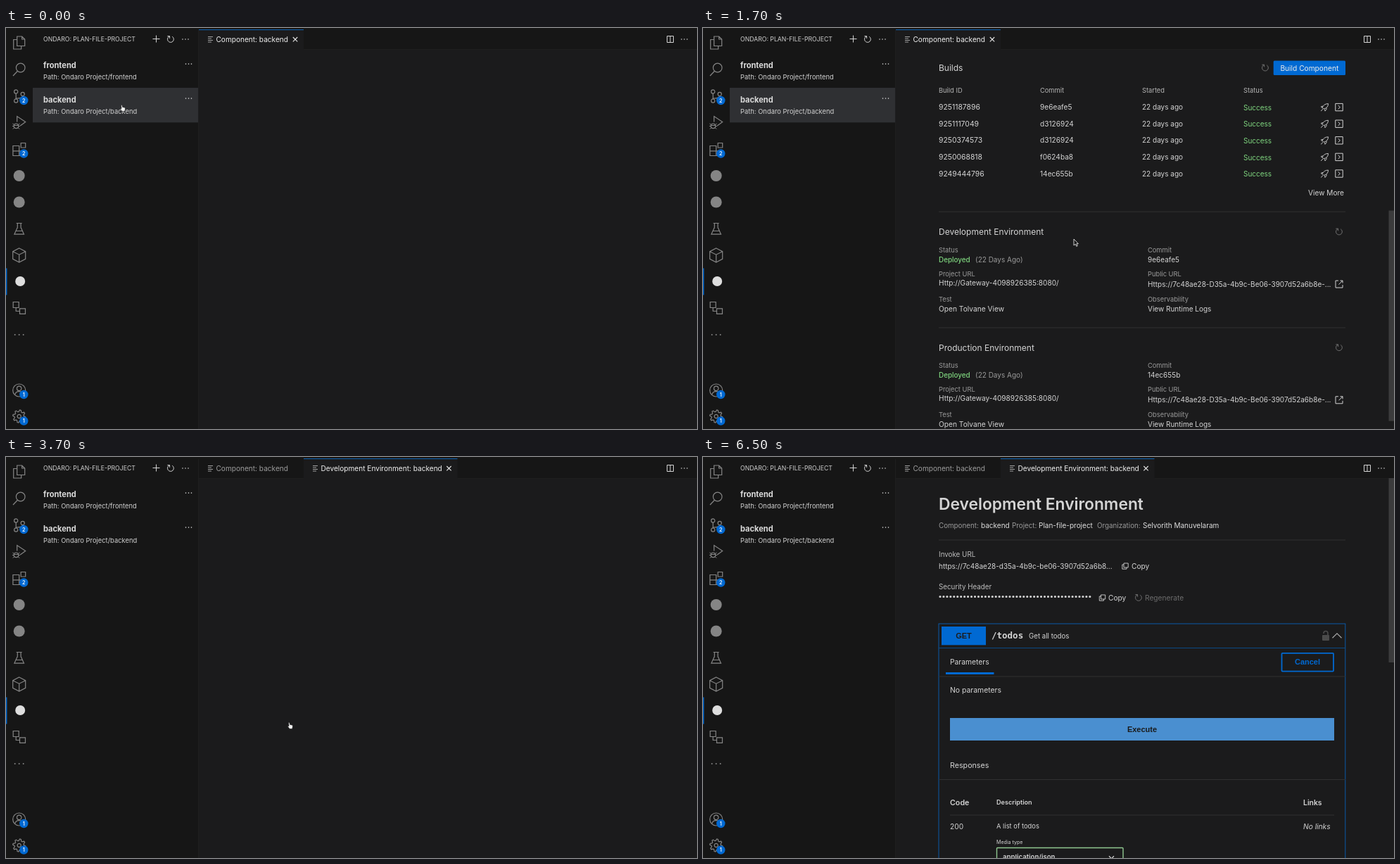
Recreate the animation shown at these times as an HTML page. Size 982 by 570 pixels, loop 6.6 s.

```html
<!DOCTYPE html>
<html lang="en">
<head>
<meta charset="utf-8">
<title>Component view</title>
<style>
  html, body { margin: 0; width: 100%; height: 100%; overflow: hidden; background: #161616; }
  svg { display: block; font-family: Inter, "Open Sans", sans-serif; }
  text { white-space: pre; }
  .helv { font-family: "Liberation Sans", Arial, sans-serif; font-weight: 700; }
  .mono { font-family: "DejaVu Sans Mono", monospace; font-weight: 700; }
</style>
</head>
<body>
<svg id="stage" width="982" height="570" viewBox="0 0 982 570"></svg>
<script>
const LOOP = 6600, STEP = 100, MAX_SCROLL = 436.8;
const BLUE = '#0069d2', GREEN = '#7fd67f', SIDE = '#161616', EDITOR = '#1b1b1c';
const TEXT = '#d4d4d4', DIM = '#9a9a9a', ICON = '#858585', RULE = '#303031';

const PROJECT = 'Plan-file-project', OWNER = 'Selvorith Manuvelaram';
const HOST = '7c48ae28-d35a-4b9c-be06-3907d52a6b8';

// Drawing helpers
const text = (x, y, s, size = 10, fill = TEXT, extra = '') =>
  `<text x="${x}" y="${y}" font-size="${size}" fill="${fill}" ${extra}>${s}</text>`;
const rect = (x, y, w, h, fill, extra = '') =>
  `<rect x="${x}" y="${y}" width="${w}" height="${h}" fill="${fill}" ${extra}/>`;
const line = (d, stroke = ICON, width = 1.2, extra = '') =>
  `<path d="${d}" fill="none" stroke="${stroke}" stroke-width="${width}" ${extra}/>`;
const circle = (x, y, r, fill, extra = '') => `<circle cx="${x}" cy="${y}" r="${r}" fill="${fill}" ${extra}/>`;
const at = (x, y, body, id = '') => `<g ${id && `id="${id}"`} transform="translate(${x} ${y})">${body}</g>`;
const group = (id, body) => `<g id="${id}">${body}</g>`;
const rule = (y, x1 = 335, x2 = 913) => line(`M${x1} ${y}H${x2}`, RULE, 1);
const END = 'text-anchor="end"', MID = 'text-anchor="middle"';
const bold = w => `font-weight="${w}"`;

const dots = (x, y, fill = TEXT, gap = 4, r = 0.8) =>
  [-1, 0, 1].map(i => circle(x + i * gap, y, r, fill)).join('');
const cross = (x, y) => line(`M${x - 3.2} ${y - 3.2}l6.4 6.4m0 -6.4l-6.4 6.4`, '#e4e4e4', 1.1);
const refresh = (x, y, c = '#707070') =>
  at(x, y, line('M-1.5 -4.2A4.4 4.4 0 1 0 2.2 -3.8M-4.6 -4.4H-1.4V-1.2', c, 1));
const copyIcon = (x, y) =>
  at(x, y, line('M-2 -4H4.2V2H-2ZM-2 -2H-4.2V4.2H2V2', TEXT, 0.9));
const tabIcon = x => line(`M${x} 12.5h7M${x} 15h5M${x} 17.5h7M${x} 20h5`, '#b0b0b0', 0.9);
const chevron = (x, y, up, c = '#a8a8a8', w = 6.5) =>
  line(`M${x - w} ${y + (up ? w / 2 : -w / 2)}l${w} ${up ? -w : w}l${w} ${up ? w : -w}`, c, 1.2);
const lock = y => rect(880, y - 1, 10, 8, '#4b4b4b', 'rx="1"') +
  line(`M882 ${y - 3}V${y - 3.5}a3 3 0 0 1 6 0V${y - 1}`, '#4b4b4b', 1.6);
const button = (x, y, w, label, fill) => rect(x, y, w, 20.3, fill, 'rx="1.5"') +
  text(x + w / 2, y + 14, label, 10.2, '#ececec', MID);

// Activity bar
function gear() {
  let d = '';
  for (let i = 0; i < 32; i++) {
    const r = i % 4 < 2 ? 9 : 6.6, a = (i + 0.5) / 32 * 2 * Math.PI;
    d += `${i ? 'L' : 'M'}${(r * Math.cos(a)).toFixed(1)} ${(r * Math.sin(a)).toFixed(1)}`;
  }
  return line(d + 'Z') + ring(0, 0, 2.6);
}
const ring = (x, y, r) => circle(x, y, r, 'none', `stroke="${ICON}" stroke-width="1.2"`);

function activityBar() {
  const icons = [
    [21, line('M-3 -9H4L8 -5V4.5H-3ZM4 -9V-5H8M-3 -4.5H-8V9H3V4.5')],
    [59, ring(2, -2.5, 6.3) + line('M-2.5 2.5L-8.7 9')],
    [97, ring(-4.5, -6.5, 2.6) + ring(-4.5, 6.5, 2.6) + ring(5, -3, 2.6) + line('M-4.5 -4V4M5 -.4Q4.5 3 -4.5 3')],
    [134.5, line('M-3 -1V-9L9 -1L1.5 4.5') + ring(-4.2, 4.8, 3.3) +
      line('M-9.3 1.5L-7 3M-9.7 5H-7.5M-9 9L-6.8 7M.9 1.5L-1.4 3M1.3 5H-1M.6 9L-1.6 7M-7.5 4H-1', ICON, 1)],
    [172.5, line('M0 2.3V-5H-8.8V9H7V2.3ZM-8.8 2.3H0V9M2.5 -9H9V-2.5H2.5Z')],
    [210, circle(0, 0, 8, ICON)],
    [247.5, circle(0, 0, 8, ICON)],
    [285.5, line('M-4 -8H4M-2.4 -8V-2L-6.8 7.6H6.8L2.4 -2V-8M-4.7 3H4.7')],
    [323, line('M0 -10L9 -5.3V5.3L0 10L-9 5.3V-5.3ZM-9 -5.3L0 -.8L9 -5.3M0 -.8V10')],
    [360, circle(1.5, 0, 7, '#dedede')],
    [398, line('M-8.5 -8.5H-.5V-.5H-8.5ZM.8 .8H8.8V8.3H.8ZM-4.5 -.5V4.5H.8')],
    [436, dots(0, 0, ICON, 6, 1)],
    [515, ring(0, 0, 9) + ring(0, -2.6, 3.2) + line('M-6 6.5Q-5 1.6 0 1.6T6 6.5')],
    [552, gear()]
  ];
  const badges = [[103, 2], [178.5, 2], [521, 1], [558.5, 1]];
  return icons.map(([y, body]) => at(18.7, y, body)).join('') +
    badges.map(([y, n]) => circle(25.3, y, 6.2, BLUE) +
      text(25.3, y + 2.6, n, 7.2, '#fff', `${MID} ${bold(600)}`)).join('') +
    rect(0, 341.5, 1.4, 38, BLUE);
}

function sidebar() {
  const item = (y, name) => text(53, y, name, 11.1, '#dadada', bold(700)) +
    text(53, y + 15.6, `Path: Ondaro Project/${name}`, 9.4, '#d0d0d0') + dots(259.5, y - 6.2);
  return text(53, 19.2, 'ONDARO: PLAN-FILE-PROJECT', 8.7, '#cecece') +
    line('M208.5 15.5h10M213.5 10.5v10', TEXT, 1) + refresh(234, 16, TEXT) + dots(255, 16) +
    rect(38, 85, 235, 49.3, '#2f3033', 'id="selected"') + item(57.3, 'frontend') + item(106.3, 'backend');
}

// Tabs
function tab(x, w, label, active) {
  return (active ? rect(x, 3, w, 28, EDITOR) + rect(x, 2, w, 1, '#0c62b5') + cross(x + w - 12, 16.2) : '') +
    tabIcon(x + 13) + text(x + 24.5, 19.8, label, 10.1, active ? '#f0f0f0' : '#9c9c9c');
}
const FIRST_TAB = 'Component: backend', SECOND_TAB = 'Development Environment: backend';

// Component page
function environment(y, title, commit) {
  const label = (x, dy, s) => text(x, y + dy, s, 9.3, DIM);
  return text(335, y, title, 12) + refresh(904, y - 4.5) +
    label(335, 24.5, 'Status') + label(632, 24.5, 'Commit') +
    text(335, y + 38.5, 'Deployed', 9.9, GREEN, bold(500)) + text(387, y + 38.5, '(22 Days Ago)', 10, DIM) +
    text(632, y + 38.5, commit) +
    label(335, 58.5, 'Project URL') + text(335, y + 71.5, 'Http://Gateway-4098926385:8080/', 10.1) +
    label(632, 58.5, 'Public URL') + text(632, y + 73.5, 'Https://7c48ae28-D35a-4b9c-Be06-3907d52a6b8e-...') +
    at(904, y + 70, line('M-1 -5H-5V5H5V1M1.5 -5H5V-1.5M5 -5L-.5 .5', TEXT, 1)) +
    label(335, 94.7, 'Test') + text(335, y + 108.7, 'Open Tolvane View', 10.2) +
    label(632, 94.7, 'Observability') + text(632, y + 108.7, 'View Runtime Logs');
}

const rocket = at(883.5, 0, line('M-1.5 2.5L-3.5 .5Q-1 -5 5 -5Q5 1 -1.5 2.5ZM-2.5 -1.5L-5 -1L-4 1M0 3L.5 5.5L2.5 3V1M-5.5 5.5L-2.5 2.7', TEXT, 0.9));
const logButton = at(904, 0, line('M-5.2 -5.2H5.2V5.2H-5.2ZM-1.4 -2.6L1.4 0L-1.4 2.6', TEXT, 1));

function componentPage() {
  const pairs = (y, rows) => rows.map(([key, value], i) =>
    text(335, y + i * 18.5, key, 9.9, '#c8c8c8') + text(913, y + i * 18.5, value, 10, TEXT, END)).join('');
  const builds = [['9251187896', '9e6eafe5'], ['9251117049', 'd3126924'], ['9250374573', 'd3126924'],
    ['9250068818', 'f0624ba8'], ['9249444796', '14ec655b']];
  const columns = [[335, 'Build ID'], [479, 'Commit'], [624, 'Started'], [768, 'Status']];
  return text(335, 74, 'backend', 22.7, TEXT, bold(600)) +
    text(439, 74, 'Service', 21.5, '#777', bold(200)) + dots(904, 66) +
    text(335, 100.5, 'Project:', 9.8, DIM) + text(373, 100.5, PROJECT, 10, '#dedede') +
    text(456, 100.5, 'Organization:', 9.8, DIM) + text(520.5, 100.5, OWNER, 10, '#dedede') +
    button(334.5, 110, 99.5, 'Open in Console', '#2e2e2f') + button(439.5, 110, 117, 'Open Git Repository', '#2e2e2f') +
    rule(155.5) + text(335, 188.3, 'Build Configurations', 12) +
    pairs(214, [['Build Pack', 'go'], ['Subdirectory', 'backend'], ['Language Version', '1.x']]) +
    rule(274) + text(335, 307.3, 'Endpoint: backend-endpoint', 12) +
    at(904, 302.5, line('M-5 5L-4 1.5L3 -5.2L5.2 -3L-1.8 4ZM1.3 -3.5L3.5 -1.3', TEXT, 1)) +
    pairs(332.7, [['Port', '8080'], ['Type', 'REST'], ['Network Visibility', 'Public'], ['Context', '/'],
      ['Schema File Path', 'restapi.yaml']]) +
    rule(433) + text(335, 475.6, 'Builds', 12) + refresh(799, 471) +
    button(810.7, 461, 102.3, 'Build Component', BLUE) +
    columns.map(([x, s]) => text(x, 506.6, s, 9.3, '#b4b4b4')).join('') +
    builds.map(([id, commit], i) => at(0, 527 + i * 23.6,
      text(335, 3.5, id, 10.4) + text(479, 3.5, commit, 10.1) + text(624, 3.5, '22 days ago') +
      text(768, 4.2, 'Success', 10, GREEN) + rocket + logButton)).join('') +
    text(911, 652, 'View More', 10.1, TEXT, END) + rule(675.6) +
    environment(708.5, 'Development Environment', '9e6eafe5') + rule(840.4) +
    environment(873.2, 'Production Environment', '14ec655b');
}

// Environment page
function operationHead(y, method, fill, path, summary, summaryX) {
  return rect(339, y - 13, 63, 26.3, fill) + text(370.5, y + 4, method, 11, '#1c1c1c', `${MID} class="helv"`) +
    text(410, y + 4.3, path, 12.5, TEXT, 'class="mono"') + text(summaryX, y + 3.8, summary, 9.7) + lock(y);
}
const operation = (y, fill, border, ...head) =>
  rect(335, y - 17.2, 577.8, 34.4, 'none', `stroke="${border}"`) +
  operationHead(y, head[0], fill, ...head.slice(1)) + chevron(901, y, false);
const execute = y => rect(351, y, 546, 32, '#4a8fd0') + text(624, y + 19.6, 'Execute', 11, '#1a1a1a', `${MID} class="helv"`);

function results() {
  return text(351, 295.4, 'Parameters', 10.3) + rect(345, 306, 68.5, 3, BLUE) +
    rect(822.5, 278.8, 73.5, 25.8, 'none', `stroke="${BLUE}" stroke-width="1.8" rx="1"`) +
    text(859, 295.4, 'Cancel', 11, BLUE, `${MID} class="helv"`) + rule(312) +
    text(351, 334.8, 'No parameters', 10.4) + execute(371) +
    text(351, 441.8, 'Responses', 10.7) + rule(458.5) +
    text(351, 494.6, 'Code', 10.7, TEXT, bold(600)) + text(417, 494.2, 'Description', 9.1, TEXT, bold(600)) +
    text(853, 494.6, 'Links', 10.4, TEXT, bold(600)) + rule(509, 351, 897) +
    text(351, 529, '200', 10.2) + text(417, 528.3, 'A list of todos', 9.4) +
    text(853, 529, 'No links', 10.2, TEXT, 'font-style="italic"') + text(417, 550.3, 'Media type', 7.1) +
    rect(417.5, 555.5, 179.5, 30, 'none', 'stroke="#8fc78f" stroke-width="1.4" rx="1"') +
    text(426, 571.6, 'application/json', 9.6, TEXT, bold(600)) + chevron(580.5, 569, false, TEXT, 3.5);
}

function environmentPage() {
  return text(335, 75, 'Development Environment', 22.8, TEXT, bold(600)) +
    text(335, 101.4, 'Component:', 9.8, DIM) + text(395, 101.4, 'backend', 10, '#dedede') +
    text(439, 101.4, 'Project:', 9.8, DIM) + text(477, 101.4, PROJECT, 10, '#dedede') +
    text(560, 101.4, 'Organization:', 9.8, DIM) + text(625, 101.4, OWNER, 10, '#dedede') + rule(118) +
    text(335, 142.3, 'Invoke URL', 9.8, '#bdbdbd') + text(335, 158.6, `https://${HOST}...`) +
    copyIcon(600, 155) + text(609, 158.6, 'Copy', 10.2) +
    text(335, 187.5, 'Security Header', 9.8, '#bdbdbd') +
    line('M337 198.5H552', TEXT, 3.2, 'stroke-linecap="round" stroke-dasharray="0 4.95"') +
    copyIcon(567.5, 200) + text(576, 203.6, 'Copy', 10.2) +
    refresh(619, 200) + text(628, 203.6, 'Regenerate', 10.2, '#6c6c6c') +
    rect(335, 237, 577.8, 34.4, 'none', 'id="block" stroke="#0b5ba8"') +
    operationHead(254, 'GET', BLUE, '/todos', 'Get all todos', 463) +
    group('closed', chevron(901, 254, false)) +
    group('opened', chevron(901, 254, true) + line('M335 271.5H913', '#0b4a85', 1)) +
    group('clipboard', at(856.5, 254.5, line('M-1.5 4.6H-4.4V-4H4.4V-1.5M-2 -5.2H2V-3H-2Z', TEXT, 1.4) +
      line('M5 1.5H-1M1.5 -1L-1.2 1.5L1.5 4', TEXT, 1.3))) +
    group('loading', at(624, 315, line('M3 -8.5A9 9 0 1 0 9 -1', '#777', 1.9), 'spinner') + execute(374)) +
    group('results', results()) +
    group('rest',
      operation(300.6, '#1fc77c', '#1a9c64', 'POST', '/todos', 'Create a new todo', 463) +
      operation(347.3, '#f5433f', '#b83634', 'DELETE', '/todos/{id}', 'Delete a todo by ID', 501) +
      operation(394, BLUE, '#0b4a85', 'GET', '/todos/{id}', 'Get a todo by ID', 501));
}

const arrow = '<path d="M-3 -5V4L-.8 2.2L.8 5.4L2.2 4.7L.8 1.7H3.4Z" fill="#111" stroke="#e4e4e4" stroke-width=".9"/>';
const hand = '<path d="M-2.6 -4.4Q-1.6 -5.4 -1 -4L-.3 -1.6L2.6 -1Q3.8 -.4 3.5 1.2L2.8 4.4H-1L-3.4 1.2Q-3.6 0 -1.9 .4Z" fill="#f2f2f2" stroke="#111" stroke-width=".6"/>';

const stage = document.getElementById('stage');
stage.innerHTML = `<clipPath id="view"><rect x="274" y="30.5" width="708" height="539.5"/></clipPath>` +
  rect(0, 0, 982, 570, SIDE) + rect(274, 30, 708, 540, EDITOR) +
  line('M273.5 3V570M274 30.5H982', '#1e1e1f', 1) +
  activityBar() + sidebar() +
  group('tabsBefore', tab(274, 149, FIRST_TAB, true)) +
  group('tabsAfter', tab(274, 149, FIRST_TAB, false) + tab(423, 218.5, SECOND_TAB, true)) +
  line('M939.5 11.5H948.5V20.5H939.5ZM944 11.5V20.5', TEXT, 1) + dots(964, 16) +
  `<g clip-path="url(#view)">${group('component', componentPage())}${group('environment', environmentPage())}</g>` +
  rect(974.5, 30, 7.5, 0, '#3b3b3c', 'id="thumb"') +
  at(0, 0, group('arrow', arrow) + group('hand', hand), 'cursor');

// Timeline
const $ = id => document.getElementById(id);
const show = (id, on) => $(id).setAttribute('display', on ? 'inline' : 'none');
const move = (id, x, y) => $(id).setAttribute('transform', `translate(${x} ${y})`);
const smooth = p => p * p * (3 - 2 * p);

function follow(keys, t) {
  const i = keys.findIndex(key => key[0] > t);
  if (i < 0) return keys[keys.length - 1].slice(1);
  const [t0, ...from] = keys[i - 1], [t1, ...to] = keys[i];
  const p = smooth((t - t0) / (t1 - t0));
  return from.map((v, k) => v + (to[k] - v) * p);
}
const CURSOR = [[0, 166, 114], [300, 166, 114], [1000, 530, 305], [1800, 530, 305], [2200, 590, 318],
  [2500, 590, 318], [3200, 404, 382], [4000, 404, 382], [4800, 518, 254], [5400, 518, 254], [6200, 560, 590]];
const SCROLL = [[0, 0], [1300, 0], [1700, 414.4], [2100, MAX_SCROLL]];
const PAGE_READY = 800, TAB_OPENED = 3600, ENV_READY = 4300, EXPANDED = 5000, LOADED = 5300;

function setThumb(contentHeight, offset) {
  const scale = 540 / contentHeight;
  $('thumb').setAttribute('y', 30 + offset * scale);
  $('thumb').setAttribute('height', 540 * scale);
}

function draw(t) {
  const second = t >= TAB_OPENED, expanded = t >= EXPANDED, loaded = t >= LOADED;
  const onPage = t >= PAGE_READY && !second, onEnv = t >= ENV_READY;
  show('selected', !second);
  show('tabsBefore', !second);
  show('tabsAfter', second);
  show('component', onPage);
  show('environment', onEnv);
  show('thumb', onPage || onEnv);

  const [scroll] = follow(SCROLL, t);
  move('component', 0, -scroll);
  if (onPage) setThumb(975, scroll);
  else setThumb(loaded ? 1113 : expanded ? 777 : 627, 0);

  show('closed', !expanded);
  show('opened', expanded);
  show('loading', expanded && !loaded);
  show('results', loaded);
  show('clipboard', t >= 4800 && t < 5600);
  show('rest', !loaded);
  move('rest', 0, expanded ? 150.2 : 0);
  $('block').setAttribute('height', loaded ? 600 : expanded ? 184.5 : 34.4);
  $('spinner').setAttribute('transform', `translate(624 315) rotate(${(t - 5200) * 0.36})`);

  const pointing = t < 400 || (t >= 3100 && t <= 4000) || (t >= 4700 && t < 5600);
  move('cursor', ...follow(CURSOR, t));
  show('hand', pointing);
  show('arrow', !pointing);
}

const start = performance.now();
function tick() {
  const t = (performance.now() - start) % LOOP;
  draw(Math.floor(t / STEP) * STEP);
  requestAnimationFrame(tick);
}
draw(0);
requestAnimationFrame(tick);
</script>
</body>
</html>
```
